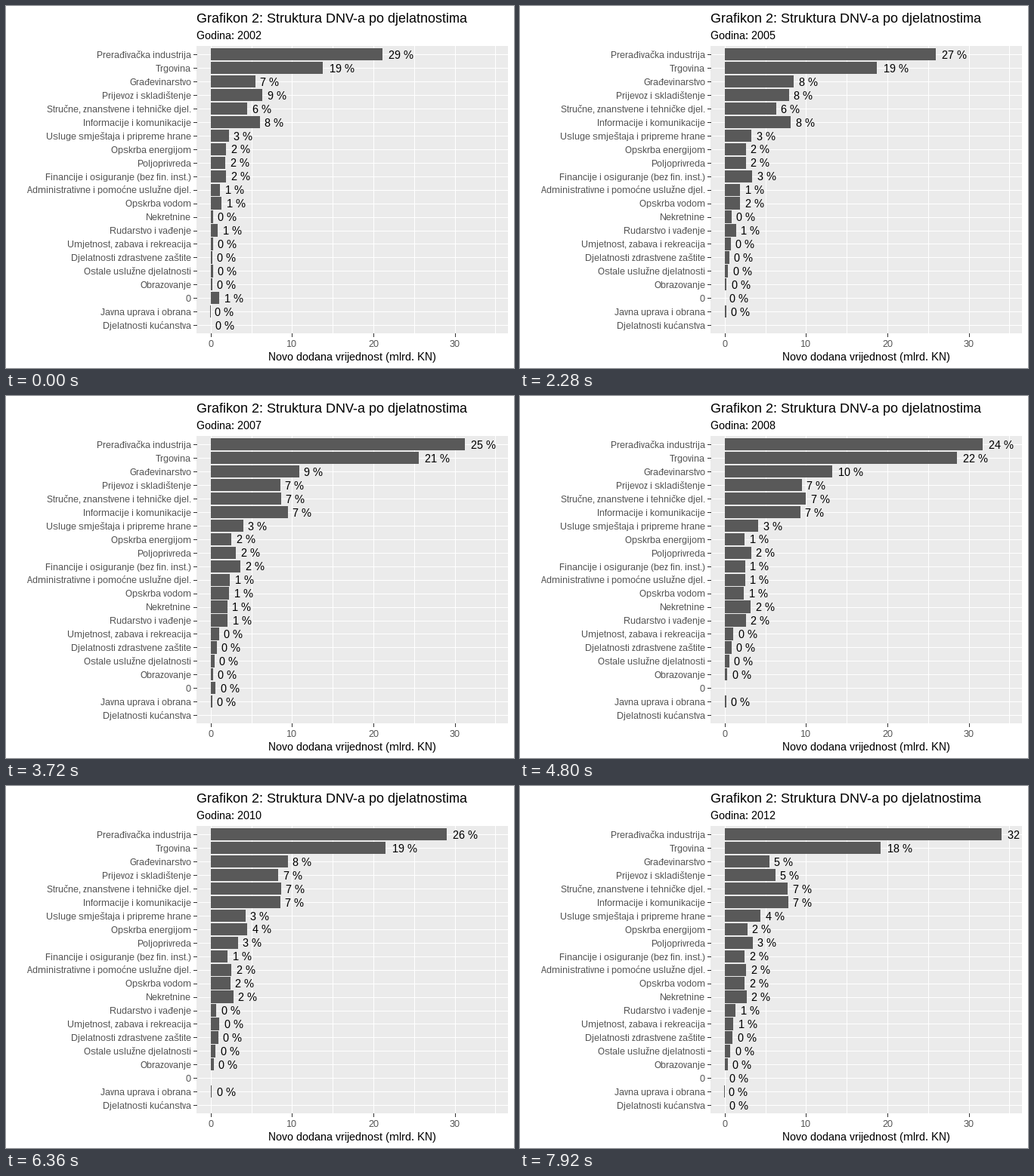
A matplotlib script that plays this animation: 672 by 480 pixels, repeating every 8000 ms.

```python
import numpy as np
import matplotlib.pyplot as plt
from matplotlib.animation import FuncAnimation
from matplotlib.patches import Rectangle

W, H, DPI = 672, 480, 96
LEFT, RIGHT, TOP, BOTTOM = 252, 664, 53, 434
ZERO, UNIT = 270.7, 10.765          # pixel of value 0, pixels per mlrd. KN
ROW0, ROW = 63.9, 17.97
BAR_H = 0.9 * ROW
SMALL, MEDIUM, LARGE = 12, 15, 18   # text sizes in pixels
YEARS = np.arange(2002, 2013)
STEPS_PER_YEAR = 6.6
HOLD = 3                            # 40 ms ticks per drawn step
NA = np.nan

# Whole-pixel glyph shapes and advances
plt.rcParams.update({"font.family": "Liberation Sans",
                     "text.hinting": "native", "text.hinting_factor": 1})

# Key points spread evenly over the years, straight lines between them
SECTORS = {
    "Prerađivačka industrija":
        [21.1, 20.9, 22.9, 26.4, 28.8, 32.2, 31.7, 27.8, 29, 34.7, 34],
    "Trgovina":
        [13.8, 14.9, 16.3, 19.1, 22.9, 26.6, 28.5, 25, 21.5, 20.3, 19.2],
    "Građevinarstvo": [5.5, 7.65, 9.6, 13.2, 9.5, 5.5],
    "Prijevoz i skladištenje": [6.38, 7.8, 8, 9.5, 8.3, 6.25],
    "Stručne, znanstvene i tehničke djel.": [4.5, 5.1, 7.9, 10, 8.65, 7.75],
    "Informacije i komunikacije": [6.05, 9.7, 7.8],
    "Usluge smještaja i pripreme hrane": [2.25, 4.1, 4.4],
    "Opskrba energijom": [1.9, 2.6, 2.6, 2.45, 4.5, 2.8],
    "Poljoprivreda": [1.8, 3.2, 3.45],
    "Financije i osiguranje (bez fin. inst.)":
        [1.9, 2.75, 4.3, 2.53, 2.08, 2.45],
    "Administrativne i pomoćne uslužne djel.": [1.15, 2.45, 2.65],
    "Opskrba vodom": [1.35, 2.35, 2.45],
    "Nekretnine": [0.3, 0.45, 1.4, 3.2, 2.8, 2.7],
    "Rudarstvo i vađenje": [0.9, 1.1, 1.8, 2.63, 0.7, 1.35],
    "Umjetnost, zabava i rekreacija": [0.3, 1.08, 1.08],
    "Djelatnosti zdrastvene zaštite": [0.2, 0.8, 1],
    "Ostale uslužne djelatnosti": [0.3, 0.7],
    "Obrazovanje": [0.2, 0.4],
    "0": [1.06] + [0] * 4 + [0.84] + [NA] * 3 + [0] * 2,
    "Javna uprava i obrana": [-0.1, 0.15, 0.2, 0.2, 0.15, -0.1],
    "Djelatnosti kućanstva": [0] + [NA] * 6 + [0, NA, 0, 0],
}


def yearly(points):
    at = np.linspace(YEARS[0], YEARS[-1], len(points))
    return np.interp(YEARS, at, points)


VALUES = np.array([yearly(p) for p in SECTORS.values()])
SHARES = 100 * VALUES / np.nansum(VALUES, axis=0)
KEYS = np.round(STEPS_PER_YEAR * (YEARS - YEARS[0])).astype(int)

fig = plt.figure(figsize=(W / DPI, H / DPI), dpi=DPI, facecolor="white")
ax = fig.add_axes([0, 0, 1, 1])
ax.set_xlim(0, W)
ax.set_ylim(H, 0)
ax.axis("off")


def line(xs, ys, color):
    ax.plot(xs, ys, color=color, lw=72 / DPI, antialiased=False,
            solid_capstyle="butt", zorder=1)


def box(x, y, w, h, color, z):
    return ax.add_patch(Rectangle((x, y), w, h, fc=color, lw=0,
                                  antialiased=False, zorder=z))


def text(x, y, s, px, color="black", ha="left"):
    return ax.text(x, y, s, fontsize=px * 72 / DPI, color=color, ha=ha,
                   va="baseline", zorder=4)


panel = box(LEFT, TOP, RIGHT - LEFT, BOTTOM - TOP, "#EBEBEB", 0)

for v in range(0, 40, 5):
    x = ZERO + UNIT * v
    line([x, x], [TOP, BOTTOM], "white")
    if v % 10 == 0:
        line([x, x], [BOTTOM, BOTTOM + 4], "#333333")
        text(x, 452, str(v), SMALL, "#4D4D4D", "center")

text(LEFT, 22, "Grafikon 2: Struktura DNV-a po djelatnostima", LARGE)
subtitle = text(LEFT, 44, "", MEDIUM)
text((LEFT + RIGHT) / 2, 470, "Novo dodana vrijednost (mlrd. KN)", MEDIUM,
     ha="center")

bars, labels = [], []
for i, name in enumerate(SECTORS):
    y = ROW0 + ROW * i
    line([LEFT, RIGHT], [y, y], "white")
    line([LEFT - 4, LEFT], [y, y], "#333333")
    text(245, y + 4.9, name, SMALL, "#4D4D4D", "right")
    bars.append(box(ZERO, y - BAR_H / 2, 0, BAR_H, "#595959", 3))
    label = text(ZERO, y + 5.8, "", MEDIUM)
    label.set_clip_on(True)
    label.set_clip_path(panel)
    labels.append(label)


def update(tick):
    step = tick // HOLD
    i = min(np.searchsorted(KEYS, step, "right") - 1, len(KEYS) - 2)
    t = (step - KEYS[i]) / (KEYS[i + 1] - KEYS[i])
    near = i + 1 if t > 0.5 else i
    subtitle.set_text(f"Godina: {round(YEARS[0] + step / STEPS_PER_YEAR)}")

    for row, (bar, label) in enumerate(zip(bars, labels)):
        a, b = VALUES[row, i], VALUES[row, i + 1]
        shown = not np.isnan(VALUES[row, near])
        bar.set_visible(shown)
        label.set_visible(shown)
        if not shown:
            continue
        # A bar with no value on one side holds the other one
        a, b = (b if np.isnan(a) else a), (a if np.isnan(b) else b)
        size = UNIT * (a + (b - a) * t)
        bar.set_x(ZERO + min(size, 0))
        bar.set_width(abs(size))
        share = str(int(SHARES[row, near]))
        width = MEDIUM * (0.556 * len(share) + 1.167)
        label.set_text(share + " %")
        label.set_x(ZERO + size + width / 4)
    return [subtitle, *bars, *labels]


anim = FuncAnimation(fig, update, frames=200, interval=40, repeat=True,
                     repeat_delay=0, blit=False)
plt.show()
```
